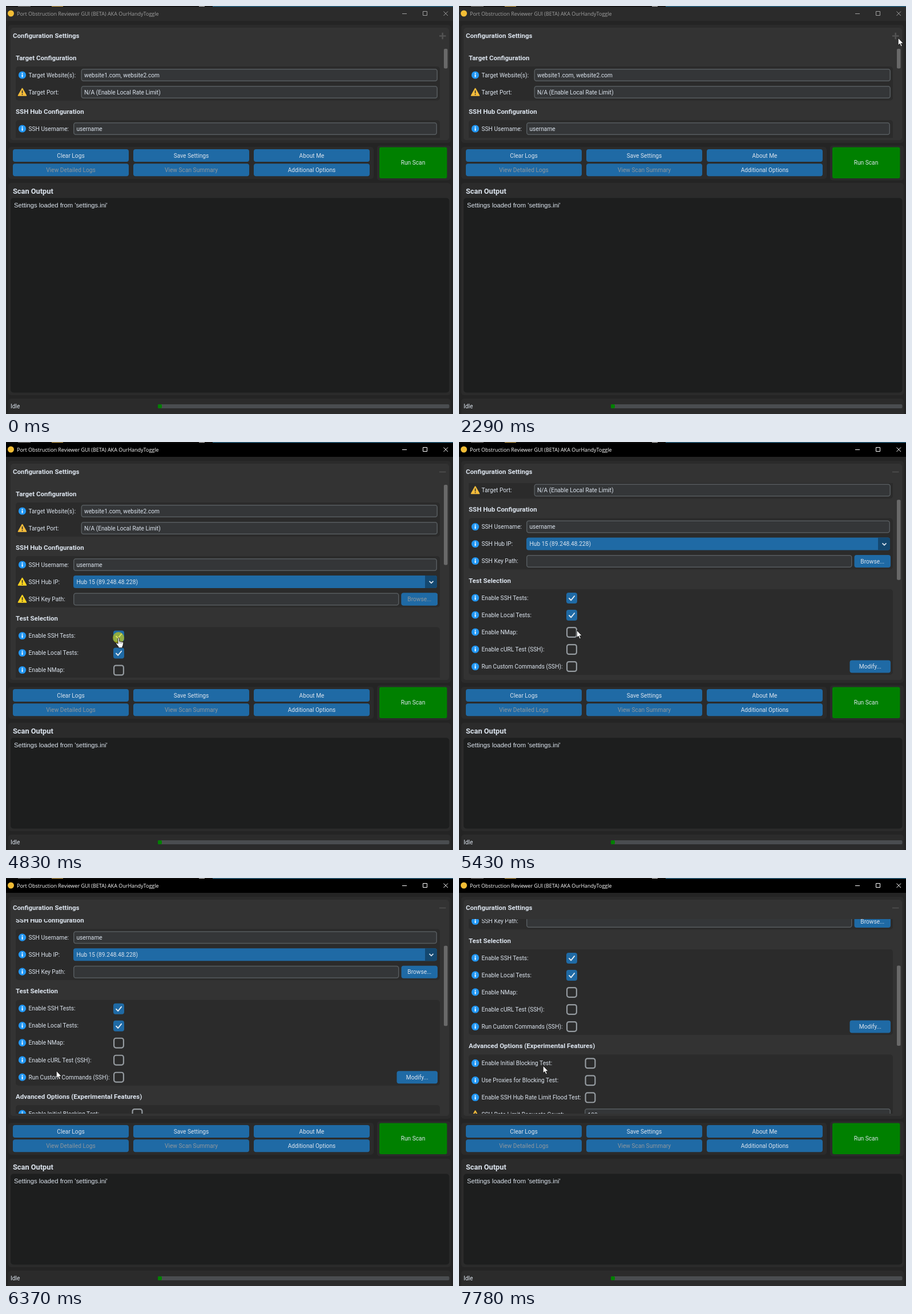
Animation of 783 by 715 pixels, one loop 8 s. Source, as an HTML page:

```html
<!DOCTYPE html>
<html lang="en">
<head>
<meta charset="utf-8">
<title>Scan settings</title>
<style>
html, body { margin: 0; width: 100%; height: 100%; overflow: hidden; background: #242424; }
svg { display: block; width: 783px; height: 715px; font: 10.2px Roboto, sans-serif; animation: notch 8s step-end infinite; }
text { fill: #dce4ee; white-space: pre; }
.head { font-weight: 700; font-size: 11.5px; }
.out { font-weight: 700; font-size: 12.8px; }
.log { font: 11.25px "Liberation Sans", Arial, sans-serif; }
.title { font: 9px "Open Sans", sans-serif; }
.mid { text-anchor: middle; }
.dim { fill: #8f979d; }
.show { visibility: hidden; animation: 8s step-end infinite; }
.small { animation: small 8s step-end infinite; }
.active { animation-name: active; }
.big { animation-name: big; }
.hot { animation-name: hot; }
.offA { animation-name: offA; }
.offB { animation-name: offB; }
.over { animation-name: over; }
.arrow { animation-name: arrow; }
.hand { animation-name: hand; }
.beam { animation-name: beam; }
.press { animation-name: press; }
#page { transform: translateY(calc(var(--n) * -22.17px)); }
#thumb { transform: translateY(calc(var(--n) * 8.73px)); }
#pointer { animation: move 8s linear infinite; }

/* wheel notches */
@keyframes notch {
  0% { --n: 0 } 63.25% { --n: 1 } 65.75% { --n: 2 } 67.875% { --n: 3 }
  77.625% { --n: 4 } 79.625% { --n: 5 } 82.125% { --n: 6 }
  92.75% { --n: 7 } 94.75% { --n: 8 } 97.25%, 100% { --n: 9 }
}
@keyframes small { 0% { visibility: visible } 32.5%, 100% { visibility: hidden } }
@keyframes big { 0% { visibility: hidden } 32.5%, 100% { visibility: visible } }
@keyframes active { 0% { visibility: hidden } 31.5%, 100% { visibility: visible } }
@keyframes hot { 0%, 18.5%, 100% { visibility: hidden } 12% { visibility: visible } }
@keyframes offA { 0%, 60.375%, 100% { visibility: hidden } 50.875% { visibility: visible } }
@keyframes offB { 0%, 60.75%, 100% { visibility: hidden } 50.875% { visibility: visible } }
@keyframes over { 0%, 50.875%, 100% { visibility: hidden } 45% { visibility: visible } }
@keyframes arrow {
  0%, 12%, 39.125%, 45% { visibility: hidden }
  10.25%, 18.5%, 41.375%, 62.5%, 100% { visibility: visible }
}
@keyframes hand { 0%, 18.5%, 62.5%, 100% { visibility: hidden } 12%, 45% { visibility: visible } }
@keyframes beam { 0%, 41.375%, 100% { visibility: hidden } 39.125% { visibility: visible } }
@keyframes press {
  0%, 33%, 53.375%, 62.5%, 100% { visibility: hidden }
  31.5%, 50.5%, 60.375% { visibility: visible }
}
@keyframes move {
  0%, 10.25% { transform: translate(626px, 690px) }
  13.375%, 16.625% { transform: translate(704px, 274px) }
  18.125% { transform: translate(716px, 252px) }
  21.875% { transform: translate(752px, 140px) }
  26.625% { transform: translate(766px, 70px) }
  28.625%, 33% { transform: translate(769px, 56px) }
  36.25% { transform: translate(560px, 130px) }
  39.125% { transform: translate(240px, 262px) }
  40.625% { transform: translate(194px, 279px) }
  41.75% { transform: translate(198px, 295px) }
  47.625%, 55.875% { transform: translate(197px, 343px) }
  57.125% { transform: translate(197px, 344px) }
  60.375%, 61% { transform: translate(197px, 343px) }
  65.75%, 67.875% { transform: translate(206px, 330px) }
  71.25% { transform: translate(209px, 320px) }
  73.25% { transform: translate(207px, 318px) }
  76.25% { transform: translate(120px, 334px) }
  79.625%, 85% { transform: translate(88px, 338px) }
  86.75% { transform: translate(90px, 336px) }
  87.5% { transform: translate(92px, 336px) }
  92.75%, 100% { transform: translate(147px, 329px) }
}
</style>
</head>
<body>
<script>
const BG = '#242424', FRAME = '#2b2b2b', PANEL = '#333', BLUE = '#1f6aa5', NAVY = '#144870';

const box = (x, y, w, h, fill, r = 0, extra = '') =>
  `<rect x="${x}" y="${y}" width="${w}" height="${h}" rx="${r}" fill="${fill}" ${extra}/>`;
const text = (x, y, s, cls = '') => `<text x="${x}" y="${y + 3.6}" class="${cls}">${s}</text>`;
const show = (cls, s) => `<g class="show ${cls}">${s}</g>`;
const line = (d, color, w = 1) => `<path d="${d}" fill="none" stroke="${color}" stroke-width="${w}"/>`;

const button = (x, y, w, s, cls = '') =>
  box(x, y - 11, w, 22, BLUE, 4) + text(x + w / 2, y, s, 'mid ' + cls);
const entry = (x, y, w, s = '') =>
  box(x + .75, y - 10.25, w - 1.5, 20.5, '#343638', 3.5, 'stroke="#565b5e" stroke-width="1.5"') + text(x + 5.5, y, s);
const tick = (x, y) =>
  `<path d="M${x - 4.5} ${y + .5}l3.2 3.4 6-7.4" fill="none" stroke="#e4ebf2" stroke-width="1.9" stroke-linecap="round" stroke-linejoin="round"/>`;
const check = (x, y, on, fill = BLUE) => on
  ? box(x - 9.5, y - 9.5, 19, 19, fill, 4) + tick(x, y)
  : box(x - 8.4, y - 8.4, 16.8, 16.8, fill, 3.5, 'stroke="#949a9f" stroke-width="2.2"');
const empty = (x, y) => check(x, y, false, FRAME);

const info = y => `<circle cx="28.5" cy="${y}" r="6.6" fill="#2196f3"/>` +
  box(27.6, y - 1.2, 1.9, 4.8, '#fff') + box(27.6, y - 3.8, 1.9, 1.8, '#fff');
const warn = (y, color) =>
  `<path d="M28.5 ${y - 6.5}l7 12.5h-14z" fill="${color}" stroke="${color}" stroke-width="1.6" stroke-linejoin="round"/>` +
  box(27.7, y - 3, 1.7, 5, '#333') + box(27.7, y + 3.2, 1.7, 1.7, '#333');
const alarm = (cls, y) => show(cls, box(20, y - 9, 18, 18, FRAME) + warn(y, '#fdd420'));
const label = (y, s, icon = info(y)) => icon + text(39.5, y, s);
const group = (y, s, rows) => text(17, y, s, 'head') + box(17, y + 15, 743, rows * 30.1 - .5, FRAME, 5);

const combo = cls => box(118, 234, 637, 22, BLUE, 4) +
  `<path d="M734 234h17a4 4 0 0 1 4 4v14a4 4 0 0 1-4 4h-17z" fill="${NAVY}"/>` +
  text(123.5, 245, 'Hub 15 (89.248.48.228)', cls) +
  line('M741.5 243.8l3.5 3.4 3.5-3.4', cls ? '#8f979d' : '#dce4ee', 1.7);

const page =
  group(91, 'Target Configuration', 2) +
  label(121, 'Target Website(s):') + entry(131.5, 121, 624.5, 'website1.com, website2.com') +
  label(151, 'Target Port:', warn(151, '#f6bd3b')) + entry(131.5, 151, 624.5, 'N/A (Enable Local Rate Limit)') +
  group(185, 'SSH Hub Configuration', 3) +
  label(215, 'SSH Username:') + entry(118, 215, 637, 'username') + alarm('offA', 215) +
  label(245, 'SSH Hub IP:') + combo('') + show('offA', combo('dim')) + alarm('offB', 245) +
  label(275, 'SSH Key Path:') + entry(118, 275.5, 570.5) + alarm('offB', 275) +
  button(692.5, 275.5, 63.5, 'Browse...') + show('offB', button(692.5, 275.5, 63.5, 'Browse...', 'dim')) +
  group(309.5, 'Test Selection', 5) +
  label(339.5, 'Enable SSH Tests:') + check(197.5, 340, true) +
  show('over', check(197.5, 340, true, NAVY)) +
  show('offA', box(187, 329, 21, 22, FRAME) + check(197.5, 340, false, NAVY)) +
  label(369.5, 'Enable Local Tests:') + check(197.5, 370, true) +
  label(399.5, 'Enable NMap:') + empty(197.5, 400) +
  label(429.8, 'Enable cURL Test (SSH):') + empty(197.5, 430) +
  label(460, 'Run Custom Commands (SSH):') + empty(197.5, 460) +
  button(684.5, 460, 71.5, 'Modify...') +
  group(493.8, 'Advanced Options (Experimental Features)', 8) +
  label(524, 'Enable Initial Blocking Test:') + empty(230, 524.3) +
  label(554, 'Use Proxies for Blocking Test:') + empty(230, 554.3) +
  label(584, 'Enable SSH Hub Rate Limit Flood Test:') + empty(230, 584.4) +
  label(614, 'SSH Rate Limit Requests Count:', warn(614, '#f6bd3b')) + entry(220, 614.5, 536, '100');

// everything under the settings panel, moved down by d
const lower = d => {
  const y = v => v + d;
  return box(0, y(231), 783, 484 - d, BG) +
    `<path d="M4 ${y(231)}v4a5 5 0 0 0 5 5h765a5 5 0 0 0 5-5v-4z" fill="${FRAME}"/>` +
    `<path d="M8 ${y(231)}v0a5 5 0 0 0 5 4h758a5 5 0 0 0 5-4z" fill="${PANEL}"/>` +
    box(4, y(247), 640, 56, FRAME, 5) + box(650, y(244.5), 129, 61, FRAME, 5) +
    button(12, y(262), 203, 'Clear Logs') + button(223, y(262), 203, 'Save Settings') +
    button(434, y(262), 203, 'About Me') + button(12, y(287.3), 203, 'View Detailed Logs', 'dim') +
    button(223, y(287.3), 203, 'View Scan Summary', 'dim') + button(434, y(287.3), 203, 'Additional Options') +
    box(654, y(247.5), 118.5, 54.5, '#008000', 3) +
    (d ? '' : show('hot', box(654, 247.5, 118.5, 54.5, '#006400', 3))) +
    text(713, y(274.5), 'Run Scan', 'mid') +
    box(4, y(310), 775, 372 - d, FRAME, 5) + text(12, y(325), 'Scan Output', 'out') +
    box(8, y(336.5), 768.5, 341 - d, '#1d1e1e', 5) +
    text(14, y(349.5), "Settings loaded from 'settings.ini'", 'log') +
    box(4, 688, 775, 32, FRAME, 5) + text(8, 701.5, 'Idle') +
    box(266, 698, 510.5, 7, '#4a4d50', 2) + box(266, 698, 7, 7, '#008000', 2);
};

const titleBar = (bg, ink) => box(0, 1.5, 783, 24.5, bg) +
  `<circle cx="8.5" cy="13" r="5.5" fill="#f2bd35"/>` +
  `<text x="19" y="16.6" class="title" style="fill:${ink}">Port Obstruction Reviewer GUI (BETA) AKA OurHandyToggle</text>` +
  line('M694 13.5h8M730.5 9.5h7v7h-7zM766.5 9.5l7.5 7.5M774 9.5l-7.5 7.5', ink);

const pointer =
  show('press', '<circle r="10" fill="#dcd800" opacity=".6"/>') +
  show('arrow', '<path d="M.3 0v12.8l2.9-2.7 2 4.7 2.1-.9-2-4.5h3.9z" fill="#fff" stroke="#000" stroke-width=".7"/>') +
  show('hand', '<path d="M-.9 1.2c0-1.6 2.4-1.6 2.4 0v5l1.9.2 1.9.5 1.9.6c1 .4 1.5.9 1.4 2l-.7 4.3-1 1.5v2.4H0v-2L-3.9 11c-.9-1.4.5-2.6 1.7-1.6l1.3 1.2z" fill="#fff" stroke="#000" stroke-width=".8"/>' +
    line('M2 7v3.2M4.1 7.2v3M6 7.8v2.6', '#444', .6)) +
  show('beam', line('M-2.5-5.5h2l.5.5.5-.5h2M0-5V5M-2.5 5.5h2l.5-.5.5.5h2', '#ddd'));

document.body.innerHTML = `<svg viewBox="0 0 783 715">
  <clipPath id="view"><rect x="8" y="72" width="768" height="341"/></clipPath>
  ${box(0, 0, 783, 715, BG)}
  ${box(0, 0, 783, 1.5, '#0a0a0a')}${box(21, 0, 22, 1.2, '#777')}${box(80, 0, 20, 1.2, '#c9a24a')}
  ${box(338, 0, 10, 1.2, '#bbb')}${box(362, 0, 421, 1.5, '#2a7196')}
  ${titleBar(FRAME, '#a0a0a0')}${show('active', titleBar('#000', '#fff'))}
  ${box(4, 33, 775, 389, FRAME, 5)}${box(8, 38, 768, 379, PANEL, 5)}
  ${text(12, 52, 'Configuration Settings', 'head')}
  ${line('M759 52.5h11.5M764.7 46.8v11.5', '#525252', 2.6)}
  ${show('big', box(757, 45, 16, 16, PANEL) + line('M759 52.5h11.5', '#505050', 1.5))}
  <g clip-path="url(#view)"><g id="page">${page}</g></g>
  <g class="small">${box(767, 75, 6.5, 34.5, '#696969', 2)}${lower(0)}</g>
  ${show('big', `<g id="thumb">${box(767, 75, 6.5, 140.5, '#696969', 2)}</g>` + lower(182))}
  <g id="pointer">${pointer}</g>
</svg>`;
</script>
</body>
</html>
```
